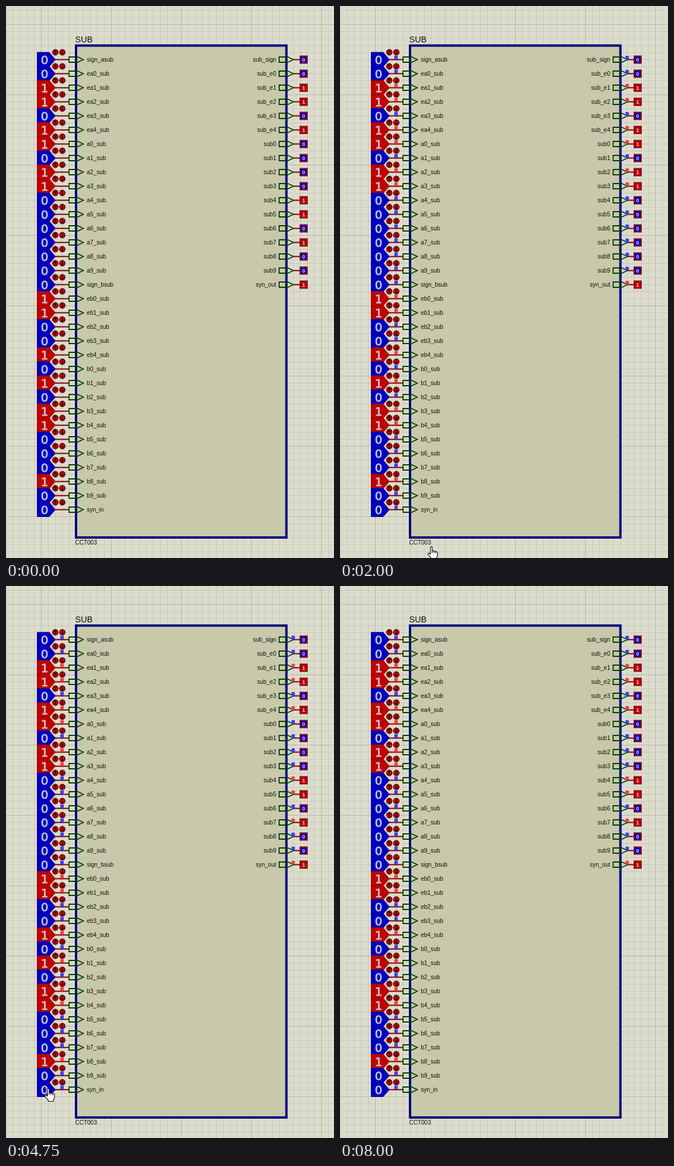
Write an HTML page that moves like this. It is 562 px wide and 942 px high and loops after 9000 ms.

```html
<!DOCTYPE html>
<html lang="en">
<head>
<meta charset="utf-8">
<title>Subtractor simulation</title>
<style>
  html, body { margin: 0; width: 100%; height: 100%; overflow: hidden; background: #dcdccc; }
  svg { display: block; width: 562px; height: 942px; }
  text { font-family: "Liberation Sans", Arial, sans-serif; font-size: 10px; fill: #101010; }
  .title { font-size: 14.5px; }
  .end { text-anchor: end; }
  .pin { fill: none; stroke: #004000; stroke-width: 1.8; }
  .wire { stroke: #800000; stroke-width: 2; }
  .digit { font: 20px "DejaVu Sans", sans-serif; text-anchor: middle; fill: #c8c8d0; stroke: #c8c8d0; stroke-width: .8; }
  .small { font: bold 9px "Liberation Sans", Arial, sans-serif; text-anchor: middle; fill: #d8d8e8; }
  .knob { fill: #b80808; stroke: #500000; stroke-width: 1.2; }
  .arrow { fill: none; stroke: #480000; stroke-width: 1.4; }
</style>
</head>
<body>
<svg id="stage" viewBox="0 0 562 942">
  <defs>
    <pattern id="minor" x="60" y="31" width="12" height="12" patternUnits="userSpaceOnUse">
      <path d="M.5 0V12M0 .5H12" stroke="#c9c9ba"/>
    </pattern>
    <pattern id="major" x="60" y="31" width="120" height="120" patternUnits="userSpaceOnUse">
      <path d="M.5 0V120M0 .5H120" stroke="#b6b6a8"/>
    </pattern>
  </defs>
  <rect width="562" height="942" fill="#dcdccc"/>
  <rect width="562" height="942" fill="url(#minor)"/>
  <rect width="562" height="942" fill="url(#major)"/>
  <rect x="120" y="67.5" width="360.5" height="839.5" fill="#c8c8aa" stroke="#000080" stroke-width="4"/>
  <text class="title" x="118.5" y="62">SUB</text>
  <text x="118.5" y="919">CCT003</text>
</svg>
<script>
const LOOP = 9000, TOP = 91.5, PITCH = 24;
const stage = document.getElementById('stage');
const bus = (name, n, tail = '') => Array.from({ length: n }, (_, i) => name + i + tail);

const inputs = ['sign_asub', ...bus('ea', 5, '_sub'), ...bus('a', 10, '_sub'),
  'sign_bsub', ...bus('eb', 5, '_sub'), ...bus('b', 10, '_sub'), 'syn_in'];
const outputs = ['sub_sign', ...bus('sub_e', 5), ...bus('sub', 10), 'syn_out'];

// [start time, bits]
const inputSteps = [
  [0, '001101' + '1011000000' + '011001' + '0101100010' + '0'],
  [3500, '001101' + '1011000000' + '011001' + '0101100010' + '1'],
  [4250, '001101' + '1011000000' + '011001' + '0101100010' + '0']
];
const outputSteps = [
  [0, '001101' + '0000110100' + '1'],
  [1500, '001101' + '1011000000' + '1'],
  [3500, '001101' + '1011000000' + '0'],
  [4750, '001101' + '0000110100' + '1']
];
const runSteps = [[0, false], [1500, true]];
// [start time, left and top of the hand]
const handSteps = [
  [0, null], [1500, [152, 926]], [1750, [150, 922]], [2250, [132, 900]],
  [2500, [106, 889]], [2750, [90, 882]], [3000, [71, 868]], [3250, [66, 857]],
  [5750, [74, 861]], [6500, [84, 869]], [6750, [78, 869]], [7000, [74.5, 861.5]],
  [7750, [73, 867]], [8000, null]
];

function add(tag, attrs, text) {
  const el = document.createElementNS('http://www.w3.org/2000/svg', tag);
  for (const key in attrs) el.setAttribute(key, attrs[key]);
  if (text !== undefined) el.textContent = text;
  return stage.appendChild(el);
}
const path = (cls, d) => add('path', { class: cls, d });
const fillOf = bit => bit === '1' ? '#c00000' : '#0000c0';

function marker(x, y) {
  const el = add('rect', { x: x - 3, y: y - 9.5, width: 6, height: 6 });
  return {
    set(bit, on) {
      el.setAttribute('fill', bit === '1' ? '#ff4040' : '#4040ff');
      el.setAttribute('visibility', on ? 'visible' : 'hidden');
    }
  };
}

function makeInput(name, i) {
  const y = TOP + i * PITCH;
  path('wire', `M84 ${y}H108`);
  path('pin', `M108 ${y - 4.5}h11.5v9h-11.5zM121 ${y - 5.5}l11.5 5.5l-11.5 5.5`);
  add('text', { x: 138.5, y: y + 3.5 }, name);
  const body = path('', `M53.5 ${y - 12.5}H74L84.5 ${y}L74 ${y + 12}H53.5z`);
  const digit = add('text', { class: 'digit', x: 66, y: y + 7.5 });
  for (const [x, dir] of [[84, -1], [96, 1]]) {
    add('circle', { class: 'knob', cx: x + .5, cy: y - 12.5, r: 4.8 });
    path('arrow', `M${x + .5} ${y - 15.5}v6m-2 ${dir < 0 ? -4 : -2}l2 ${2 * dir}l2 ${-2 * dir}`);
  }
  const mark = marker(96, y + 3);
  return (bit, on) => {
    body.setAttribute('fill', fillOf(bit));
    body.setAttribute('stroke', bit === '1' ? '#980000' : '#000098');
    digit.textContent = bit;
    mark.set(bit, on);
  };
}

function makeOutput(name, i) {
  const y = TOP + i * PITCH;
  path('wire', `M493 ${y}H504`);
  path('pin', `M468 ${y - 4.5}h11.5v9h-11.5zM481 ${y - 5.5}l11.5 5.5l-11.5 5.5`);
  add('text', { class: 'end', x: 463, y: y + 3.5 }, name);
  const box = add('rect', { x: 504, y: y - 6, width: 12, height: 12, stroke: '#900010', 'stroke-width': 2 });
  const digit = add('text', { class: 'small', x: 510, y: y + 3.3 });
  const mark = marker(492, y + 3);
  return (bit, on) => {
    box.setAttribute('fill', fillOf(bit));
    digit.textContent = bit;
    mark.set(bit, on);
  };
}

const setInput = inputs.map(makeInput);
const setOutput = outputs.map(makeOutput);
const hand = add('path', {
  d: 'M5 2Q5 .5 6.5 .5Q8 .5 8 2V8Q9.5 7 10.8 8.3Q12.5 7.6 13.8 9Q16 8.6 17 10.5V15Q16.5 18 15 20V22.5H6.5V20.5Q3 17 .8 13.5Q.5 11.5 2.5 11.5L5 13.5zM8 8v3.5M11 8.5v3M14 9.5v2.5',
  fill: '#fff', stroke: '#000', 'stroke-width': 1.1, 'stroke-linejoin': 'round'
});

const at = (steps, t) => steps.findLast(step => step[0] <= t)[1];
let shown = '';

function draw(now) {
  const t = now % LOOP;
  const ins = at(inputSteps, t), outs = at(outputSteps, t), on = at(runSteps, t);
  const state = ins + outs + on;
  if (state !== shown) {
    shown = state;
    setInput.forEach((set, i) => set(ins[i], on));
    setOutput.forEach((set, i) => set(outs[i], on));
  }
  const pos = at(handSteps, t);
  hand.setAttribute('visibility', pos ? 'visible' : 'hidden');
  if (pos) hand.setAttribute('transform', `translate(${pos})`);
}

const start = performance.now();
function tick() {
  draw(performance.now() - start);
  requestAnimationFrame(tick);
}
tick();
</script>
</body>
</html>
```
